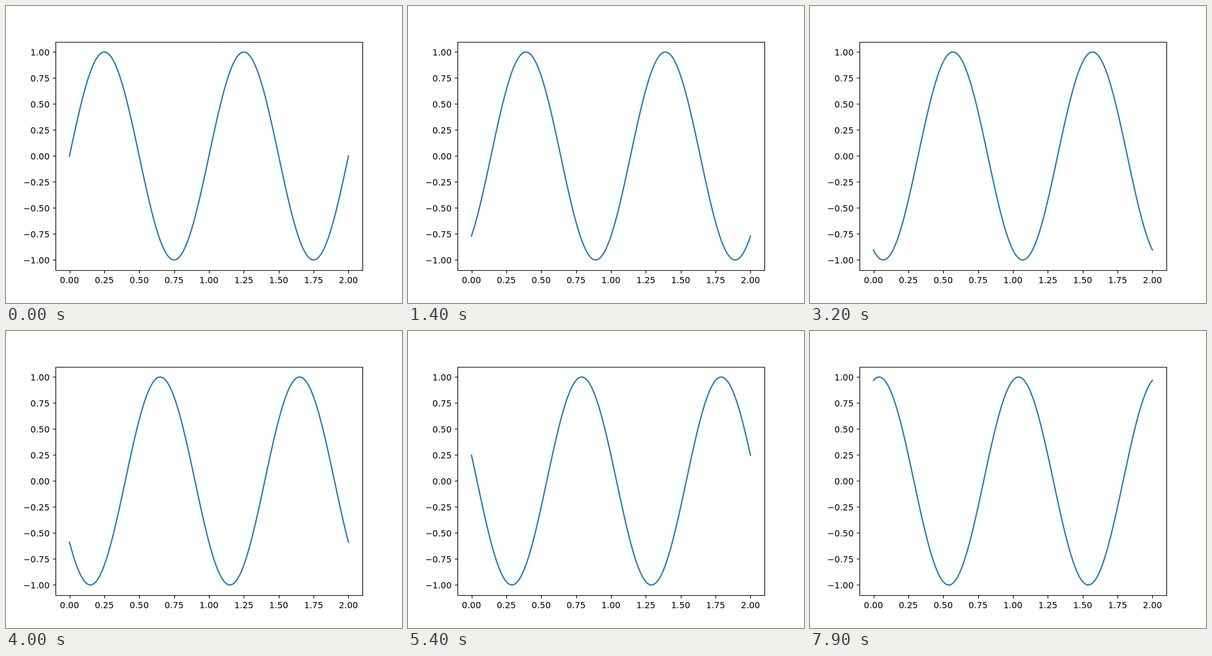
An HTML page for the animation above (8 s loop, 640x480 px).

```html
<!DOCTYPE html>
<html>
<head>
<meta charset="utf-8">
<style>
  html, body { margin: 0; width: 100%; height: 100%; overflow: hidden; background: #fff; }
  svg { display: block; }
  text { font: 13.889px "DejaVu Sans", sans-serif; }
  path { fill: none; stroke: #000; stroke-width: 1.11; }
  #wave { stroke: #1f77b4; stroke-width: 2.083; stroke-linecap: square; stroke-linejoin: round; }
</style>
</head>
<body>
<svg width="640" height="480" viewBox="0 0 640 480">
  <path id="wave"/>
  <path id="ticks"/>
  <path d="M80.5 58.5H576.5V427.5H80.5Z"/>
  <g id="labels"></g>
</svg>
<script>
const $ = id => document.getElementById(id);
const px = x => 102.545 + x * 225.4545;
const py = y => 242.4 - y * 168;
const snap = v => Math.round(v) + 0.5;

function label(text, x, y, anchor) {
  const el = document.createElementNS('http://www.w3.org/2000/svg', 'text');
  el.setAttribute('x', x);
  el.setAttribute('y', y);
  el.setAttribute('text-anchor', anchor);
  el.textContent = text;
  $('labels').append(el);
}

let ticks = '';
for (let i = 0; i <= 8; i++) {
  const x = i / 4, y = i / 4 - 1;
  ticks += `M${snap(px(x))} 427.5v4.86M80.5 ${snap(py(y))}h-4.86`;
  label(x.toFixed(2), px(x), 448, 'middle');
  label(y.toFixed(2).replace('-', '\u2212'), 70.5, Math.round(py(y) + 5.5), 'end');
}
$('ticks').setAttribute('d', ticks);

// The wave moves right by 0.01 every 100 ms.
function draw(now) {
  const shift = Math.floor(now % 8000 / 100) * 0.01;
  const points = [];
  for (let i = 0; i <= 500; i++) {
    const x = i / 250;
    points.push(px(x).toFixed(2) + ' ' + py(Math.sin(2 * Math.PI * (x - shift))).toFixed(2));
  }
  $('wave').setAttribute('d', 'M' + points.join('L'));
}

let start;
function tick(now) {
  start ??= now;
  draw(now - start);
  requestAnimationFrame(tick);
}
draw(0);
requestAnimationFrame(tick);
</script>
</body>
</html>
```
